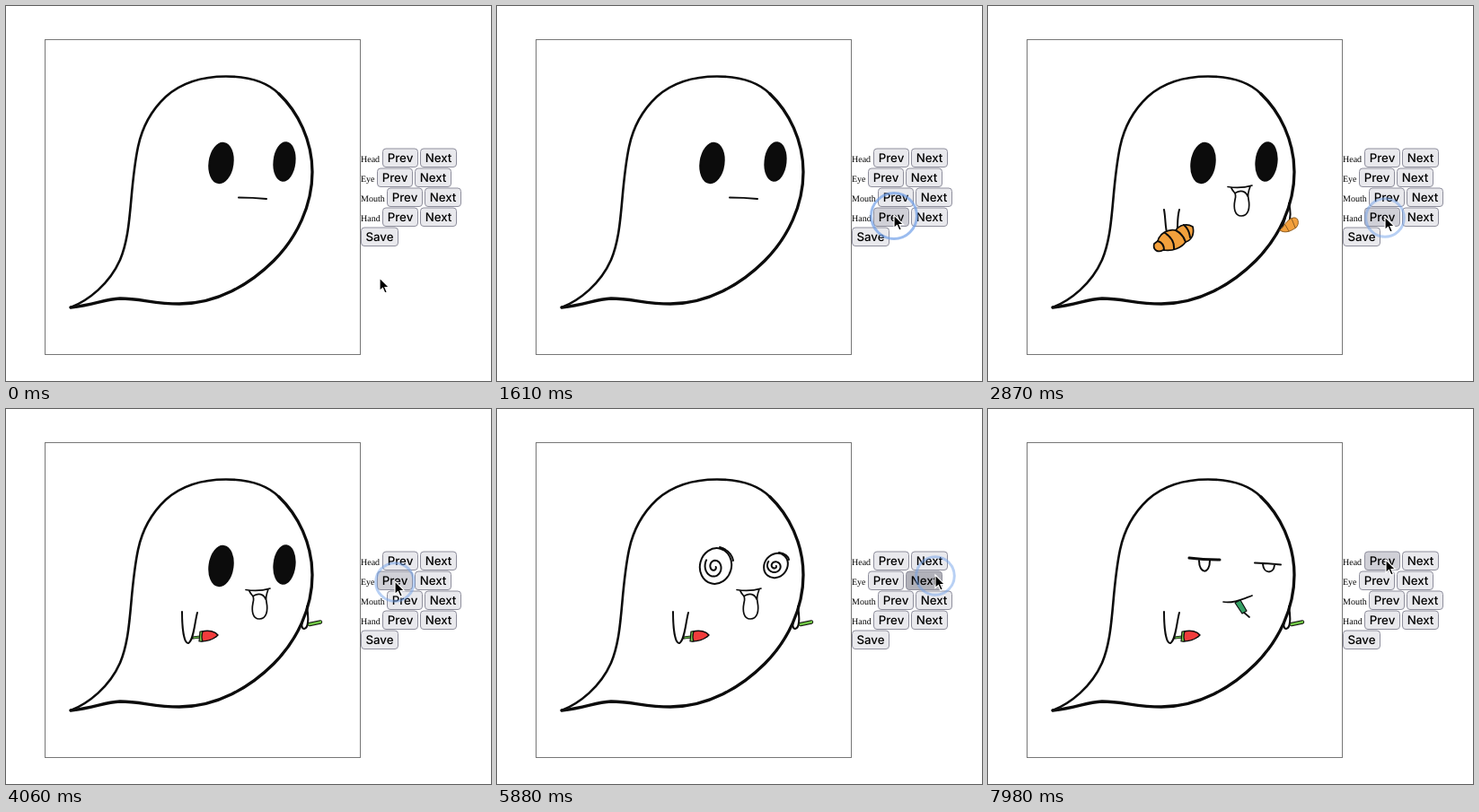
These frames come from a looping animation (540 by 418 pixels, 8 s). An HTML page:

```html
<!DOCTYPE html>
<html lang="en">
<head>
<meta charset="utf-8">
<style>
html, body { margin: 0; width: 100%; height: 100%; overflow: hidden; background: #fff; }
svg { display: block; }
.label { font: 10px "Liberation Serif", serif; text-rendering: geometricPrecision; }
.button text { font: 500 13.3px Inter, sans-serif; text-anchor: middle; text-rendering: geometricPrecision; }
.button rect { stroke: #8f8f9d; }
.ink { fill: none; stroke: #0c0c0c; stroke-width: 2; stroke-linecap: round; stroke-linejoin: round; }
.part { display: none; }
.solid { fill: #0c0c0c; }
</style>
</head>
<body>
<svg width="540" height="418" viewBox="0 0 540 418">
  <rect x="43.5" y="37.5" width="351" height="351" fill="none" stroke="#777"/>
  <g class="ink">
    <path stroke-width="2.6" d="M72 336C92 328 115 310 127 283C141 250 137 205 147 157C152 133 162 116 178 101C197 84 220 78.500 245 78.500C270 78.500 290 84 304 98"/>
    <path stroke-width="3.3" d="M304 98C325 118 341 150 341 185C341 222 324 258 298 284C272 310 235 332 193 332C165 332 150 326 127 326C108 327 100 333 72 336"/>

    <g class="part" id="eye-black">
      <ellipse class="solid" cx="239.500" cy="175" rx="13" ry="22.300" transform="rotate(8 239.500 175)"/>
      <ellipse class="solid" cx="310" cy="173.500" rx="11.500" ry="21.300" transform="rotate(6 310 173.500)"/>
    </g>
    <g class="part" id="eye-open">
      <ellipse cx="240" cy="174.500" rx="12.500" ry="22" transform="rotate(12 240 174.500)"/>
      <ellipse cx="310" cy="172.500" rx="11" ry="21" transform="rotate(11 310 172.500)"/>
      <path d="M224 153.500Q244 151 264 151M227 197.500Q244 196 261 194M297 153L323 151M291 193H321"/>
    </g>
    <g class="part" id="eye-spiral">
      <ellipse cx="243.500" cy="175" rx="17.500" ry="20" transform="rotate(15 243.500 175)"/>
      <ellipse cx="310.500" cy="174.500" rx="12.500" ry="14.500" transform="rotate(40 310.500 174.500)"/>
      <path id="spirals"/>
      <path d="M248 154Q261 158 263 169M314 160Q324 162 325 168"/>
    </g>
    <g class="part" id="eye-half">
      <path stroke-width="3" d="M224 166Q240 168 258 168"/>
      <path d="M235 169C235 184 247 185 247 169M297 171.500Q312 172 326 173.500M306 173C307 184 318 184 319 174"/>
    </g>

    <path class="part" id="mouth-line" d="M259 213.500Q275 213.500 290 215"/>
    <path class="part" id="mouth-tongue" stroke-width="1.700" d="M267 201.500Q281 204 294 200M271 203C274 209 277 208 275 216C273 226 275 234 282 234C290 234 292 225 290 215C289 211 290 206 292 201M276 208C281 205 287 206 289 212"/>
    <g class="part" id="mouth-green" stroke-width="1.700">
      <path d="M262 215C272 217 283 212 294 208M284 226L291 232"/>
      <path fill="#35a065" stroke-width="1.200" d="M275 216L281 213L288 225L283 228Z"/>
    </g>

    <g class="part" id="hand-croissant">
      <path d="M196 227C198 238 197 247 200 256M213 227C210 238 212 246 210 254M335 220C338 232 336 240 334 244M331 236L328 246"/>
      <path fill="#f3a03c" stroke-width="1.700" d="M185 265C183 273 190 275 195 272C206 274 216 269 220 263C227 261 230 254 228 246C221 242 213 244 209 250C200 248 191 254 189 262Z"/>
      <path d="M189 262Q196 264 196 272M197 253Q208 260 207 271M209 250Q217 254 220 263M218 244Q224 249 225 258"/>
      <path fill="#f3a03c" stroke="#8b5b20" stroke-width="1" d="M325 250C330 246 332 238 340 236C346 235 347 243 343 247C337 251 331 254 325 250Z"/>
      <path stroke="#8b5b20" stroke-width="1" d="M331 244L335 251M338 237L342 247"/>
    </g>
    <g class="part" id="hand-chili">
      <path d="M196 226C196 244 198 261 203 261C209 258 210 238 213 227M335 220C337 232 337 244 332 245C329 245 329 240 330 237"/>
      <path stroke-width="3" d="M208 255L216 254"/>
      <path stroke="#68b94b" stroke-width="1.500" d="M209 255L216 254"/>
      <path fill="#f13c3c" stroke-width="1.400" d="M218 248C226 246 233 248 236 252C231 257 225 259 217 259Z"/>
      <path fill="#79c94c" stroke-width="1.200" d="M216 248L219 248Q217 254 219 259L215 259Z"/>
      <path stroke-width="4.500" d="M338 240L350 237.500"/>
      <path stroke="#70c545" stroke-width="2.800" d="M338 240L350 237.500"/>
    </g>
  </g>
  <g id="controls"></g>
  <circle id="ring" fill="none" stroke="#6f9fe8" stroke-width="3"/>
  <path id="cursor" d="M0 0V14.500L3.400 11.500L5.800 17L8.300 16L6 10.600H10.500Z" fill="#000" stroke="#fff" stroke-width="1.200"/>
</svg>
<script>
const LOOP = 8000, RING_TIME = 490;
const byId = id => document.getElementById(id);

// [time, x, y]
const path = [
  [0, 416, 303], [350, 416, 303], [1190, 442, 233], [2060, 442, 233],
  [2240, 446, 213], [2460, 446, 213], [2730, 442, 235], [3600, 442, 235],
  [3920, 433, 192], [5270, 433, 190], [5600, 488, 185], [6130, 488, 185],
  [6430, 447, 213], [7320, 447, 213], [7420, 446, 211], [7600, 446, 211],
  [7910, 443, 168], [8000, 443, 168]
];
// [press time, hold]
const clicks = [[1470, 100], [2240, 60], [2800, 60], [3990, 60], [4690, 60], [5180, 60], [5810, 140], [6510, 60]];
const looks = {
  eye: [[0, "black"], [4180, "open"], [4890, "half"], [5370, "spiral"], [6020, "half"]],
  mouth: [[0, "line"], [2450, "tongue"], [6720, "green"]],
  hand: [[0, "none"], [1680, "croissant"], [3010, "chili"]]
};

const buttons = [];
function addButton(x, y, width, text) {
  const group = document.createElementNS("http://www.w3.org/2000/svg", "g");
  group.setAttribute("class", "button");
  group.innerHTML = `<rect x="${x + .5}" y="${y + .5}" width="${width - 1}" height="20.5" rx="3.5"/>
    <text x="${x + width / 2}" y="${y + 15.7}">${text}</text>`;
  byId("controls").append(group);
  buttons.push({ x, y, width, rect: group.firstChild });
}
[["Head", 419], ["Eye", 413], ["Mouth", 424], ["Hand", 419]].forEach(([name, x], row) => {
  const y = 158.5 + row * 22;
  byId("controls").insertAdjacentHTML("beforeend", `<text class="label" x="395" y="${y + 15.5}">${name}</text>`);
  addButton(x, y, 40, "Prev");
  addButton(x + 42, y, 41, "Next");
});
addButton(395, 246.5, 42, "Save");

function spiral(cx, cy, rx, ry) {
  let d = "";
  for (let i = 0; i <= 50; i++) {
    const angle = i / 50 * Math.PI * 3.2, r = .15 + .85 * i / 50;
    d += `${i ? "L" : "M"}${cx + r * rx * Math.cos(angle)} ${cy + r * ry * Math.sin(angle)}`;
  }
  return d;
}
byId("spirals").setAttribute("d", spiral(242, 176, 11, 13) + spiral(309.5, 175, 9, 8.5));

function cursorAt(t) {
  const i = path.findIndex(key => key[0] > t);
  const [t0, x0, y0] = path[i - 1], [t1, x1, y1] = path[i];
  const u = (t - t0) / (t1 - t0), ease = u * u * (3 - 2 * u);
  return [x0 + (x1 - x0) * ease, y0 + (y1 - y0) * ease];
}

function render(t) {
  const [x, y] = cursorAt(t);
  byId("cursor").setAttribute("transform", `translate(${x} ${y})`);

  const click = clicks.findLast(([start]) => start <= t);
  const age = click ? t - click[0] : LOOP;
  const pulse = age < RING_TIME ? Math.sin(Math.PI * age / RING_TIME) : 0;
  const ring = byId("ring");
  ring.setAttribute("cx", x);
  ring.setAttribute("cy", y + 1);
  ring.setAttribute("r", 16 + 12 * pulse);
  ring.setAttribute("opacity", .8 * pulse ** .6);

  for (const b of buttons) {
    const hover = x >= b.x && x < b.x + b.width && y >= b.y && y < b.y + 21.5;
    const pressed = hover && click && age < click[1];
    b.rect.setAttribute("fill", pressed ? "#b1b1b9" : hover ? "#d0d0d7" : "#e9e9ed");
  }

  const shown = Object.entries(looks).map(([part, steps]) =>
    `${part}-${steps.findLast(([start]) => start <= t)[1]}`);
  for (const part of document.querySelectorAll(".part"))
    part.style.display = shown.includes(part.id) ? "inline" : "none";
}

function frame() {
  render(performance.now() % LOOP);
  requestAnimationFrame(frame);
}
frame();
</script>
</body>
</html>
```
